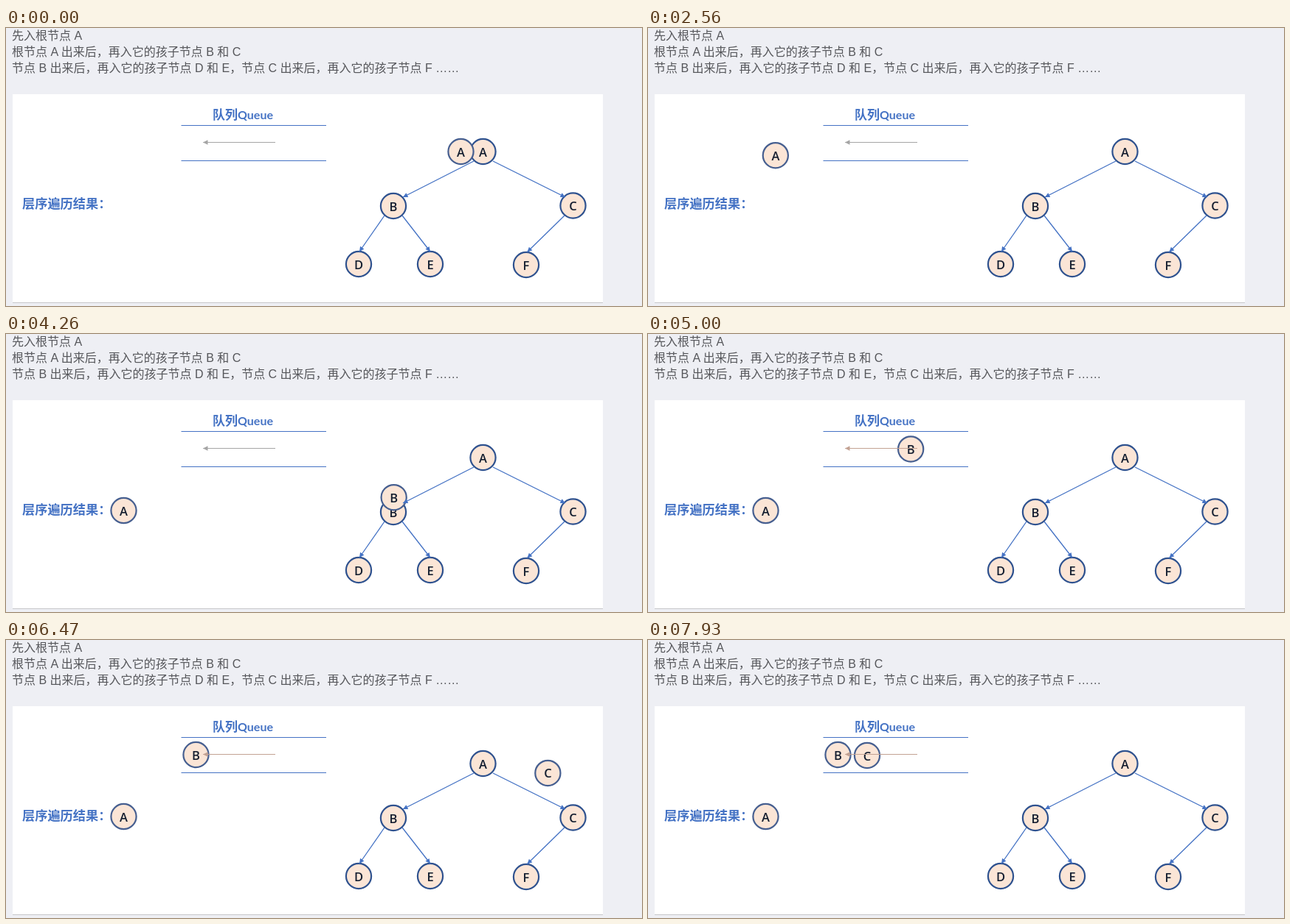
Write an HTML page that moves like this. It is 862 px wide and 378 px high and loops after 8000 ms.

```html
<!DOCTYPE html>
<html lang="zh-CN">
<head>
<meta charset="utf-8">
<style>
  html, body { margin: 0; width: 100%; height: 100%; overflow: hidden; background: #eeeff4; }
  svg { display: block; }
  text { white-space: pre; }
  .note { font: 16px "Liberation Sans", "Noto Sans CJK SC", "Noto Sans CJK", sans-serif; fill: #55565a; }
  .head { font: bold 17px Lato, "Noto Sans CJK SC", "Noto Sans CJK", sans-serif; fill: #4472c4; }
  .node { font: 600 16.5px "Open Sans", "Noto Sans", sans-serif; fill: #141e30; text-anchor: middle; }
  .node circle { fill: #fbe5d6; stroke: #2f528f; stroke-width: 2.2; }
  .copy circle { stroke: #465f90; }
  .rule { stroke: #4472c4; stroke-width: 1.1; }
</style>
</head>
<body>
<svg id="stage" width="862" height="378" viewBox="0 0 862 378">
  <text class="note" x="8" y="16">先入根节点 A</text>
  <text class="note" x="8" y="38">根节点 A 出来后，再入它的孩子节点 B 和 C</text>
  <text class="note" x="8" y="60">节点 B 出来后，再入它的孩子节点 D 和 E，节点 C 出来后，再入它的孩子节点 F ……</text>
  <rect x="9" y="90" width="800" height="283" fill="#fff"/>
  <path d="M9 373.5H809" stroke="#c6c7ca"/>
  <text class="head" x="280" y="124">队列<tspan font-size="16">Queue</tspan></text>
  <text class="head" x="22" y="245" style="font-size:17.2px">层序遍历结果：</text>
  <path class="rule" d="M237.500 132.500H434M237.500 180.500H434"/>
  <g id="nodes"></g>
  <g id="copies"></g>
  <g id="edges"></g>
  <g id="queueArrow"></g>
</svg>
<script>
const LOOP = 8000, TRAVEL = 1680;
const $ = id => document.getElementById(id);

const nodes = { A: [646.5, 168], B: [525, 242], C: [768.5, 241.5], D: [478, 321], E: [575, 321], F: [705, 322] };
const edges = [
  [634, 181, 538, 230], [660, 181, 758, 230], [513, 255, 479, 304],
  [537, 255, 575, 304], [757, 255, 706.5, 304.5]
];

// Each leg: node, start time, route
const legs = [
  ['A', -328, 'M646.500 168H335Q268 168 257.500 156'],
  ['A', 1669, 'M257.500 156H222Q160 156 159 215L159.500 240'],
  ['B', 3970, 'M525 242L526 212Q525 157 460 157L257.500 156'],
  ['C', 6025, 'M768.500 241.500Q764 200 736 182Q710 165 645 165L297 157']
].map(([name, start, d]) => {
  const path = document.createElementNS('http://www.w3.org/2000/svg', 'path');
  path.setAttribute('d', d);
  return { name, start, path, length: path.getTotalLength() };
});

const circle = (name, [x, y], attrs) =>
  `<g ${attrs} transform="translate(${x} ${y})"><circle r="17.100"/><text y="6.500">${name}</text></g>`;

function arrow([x1, y1, x2, y2], color, width) {
  const angle = Math.atan2(y2 - y1, x2 - x1) * 180 / Math.PI;
  return `<path d="M${x1} ${y1}L${x2} ${y2}" stroke="${color}" stroke-width="${width}"/>
    <path d="M0 0L-6.500 -3.200V3.200Z" fill="${color}" transform="translate(${x2} ${y2}) rotate(${angle})"/>`;
}

$('nodes').innerHTML = Object.entries(nodes).map(([name, at]) => circle(name, at, 'class="node"')).join('');
$('copies').innerHTML = ['A', 'B', 'C'].map(name => circle(name, nodes[name], `class="node copy" id="copy${name}"`)).join('');
$('edges').innerHTML = edges.map(e => arrow(e, '#4472c4', 1.3)).join('');

const ease = u => u < 0.5 ? 2 * u * u : 1 - 2 * (1 - u) ** 2;

function draw(t) {
  let queued = false;
  for (const name of ['A', 'B', 'C']) {
    const leg = legs.filter(l => l.name === name && l.start <= t).pop();
    const copy = $('copy' + name);
    copy.style.display = leg ? '' : 'none';
    if (!leg) continue;
    const u = Math.min(1, (t - leg.start) / TRAVEL);
    const p = leg.path.getPointAtLength(ease(u) * leg.length);
    copy.setAttribute('transform', `translate(${p.x.toFixed(2)} ${p.y.toFixed(2)})`);
    queued ||= p.x > 235 && p.x < 380;
  }
  // The queue arrow turns warm while a node lies under it
  $('queueArrow').innerHTML = arrow([365, 155.5, 267, 155.5], queued ? '#c3a293' : '#a5a5a5', 1);
}

const begin = performance.now();
function tick() {
  draw((performance.now() - begin) % LOOP);
  requestAnimationFrame(tick);
}
tick();
</script>
</body>
</html>
```
